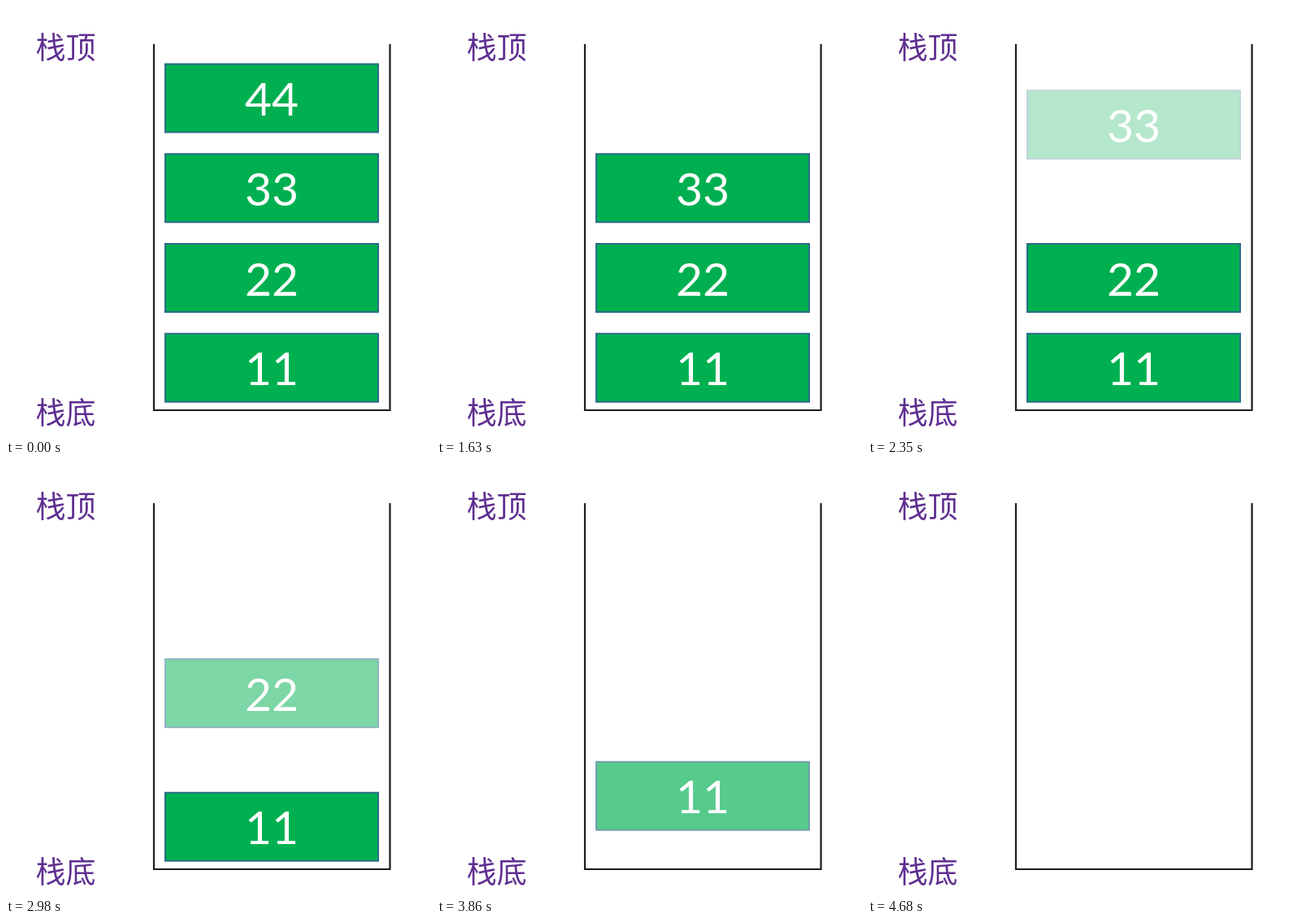
An HTML page that plays this animation: 523 px wide and 531 px high, repeating every 4.81 s.

```html
<!DOCTYPE html>
<html lang="zh-CN">
<head>
<meta charset="utf-8">
<title>出栈</title>
<style>
  html, body { margin: 0; width: 100%; height: 100%; overflow: hidden; background: #fff; }
  svg { display: block; }
  .label { font: 37px "Noto Sans CJK SC", "Noto Sans CJK", sans-serif; fill: #5f2f91; }
  .wall { fill: none; stroke: #1c1c1c; stroke-width: 2.2; }
  .block rect { fill: #00b050; stroke: #2a6c88; stroke-width: 2; }
  .block text { font: 57px Lato, sans-serif; fill: #fff; text-anchor: middle; }
</style>
</head>
<body>
<svg id="stage" width="523" height="531" viewBox="0 0 523 531">
  <text class="label" x="36.5" y="65">栈顶</text>
  <text class="label" x="36.5" y="515">栈底</text>
  <path class="wall" d="M182 47V498H472.5V47"/>
</svg>
<script>
const LOOP = 4810, STEP = 66, DURATION = 770, RISE = 110;

// start: first visible move; lead: progress in ms already made at that moment
const blocks = [
  { value: 44, y: 71.5,  start: 270,  lead: 17 },
  { value: 33, y: 182.3, start: 1820, lead: 19 },
  { value: 22, y: 293,   start: 2640, lead: 47 },
  { value: 11, y: 403.7, start: 3660, lead: 68 },
];

const stage = document.getElementById('stage');

function add(parent, tag, attrs, text = '') {
  const node = document.createElementNS('http://www.w3.org/2000/svg', tag);
  for (const key in attrs) node.setAttribute(key, attrs[key]);
  node.textContent = text;
  return parent.appendChild(node);
}

for (const b of blocks) {
  b.node = add(stage, 'g', { class: 'block' });
  add(b.node, 'rect', { x: 196, y: 0, width: 262, height: 84 });
  add(b.node, 'text', { x: 327, y: 63.5 }, b.value);
}

function progress(b, t) {
  if (t < b.start) return 0;
  const steps = Math.floor((t - b.start) / STEP);
  return Math.min(1, (b.lead + steps * STEP) / DURATION);
}

function draw(now) {
  const t = now % LOOP;
  for (const b of blocks) {
    const p = progress(b, t);
    b.node.setAttribute('transform', `translate(0 ${b.y - RISE * p})`);
    b.node.setAttribute('opacity', 1 - p);
  }
}

const origin = performance.now();
function tick() {
  draw(performance.now() - origin);
  requestAnimationFrame(tick);
}
tick();
</script>
</body>
</html>
```
